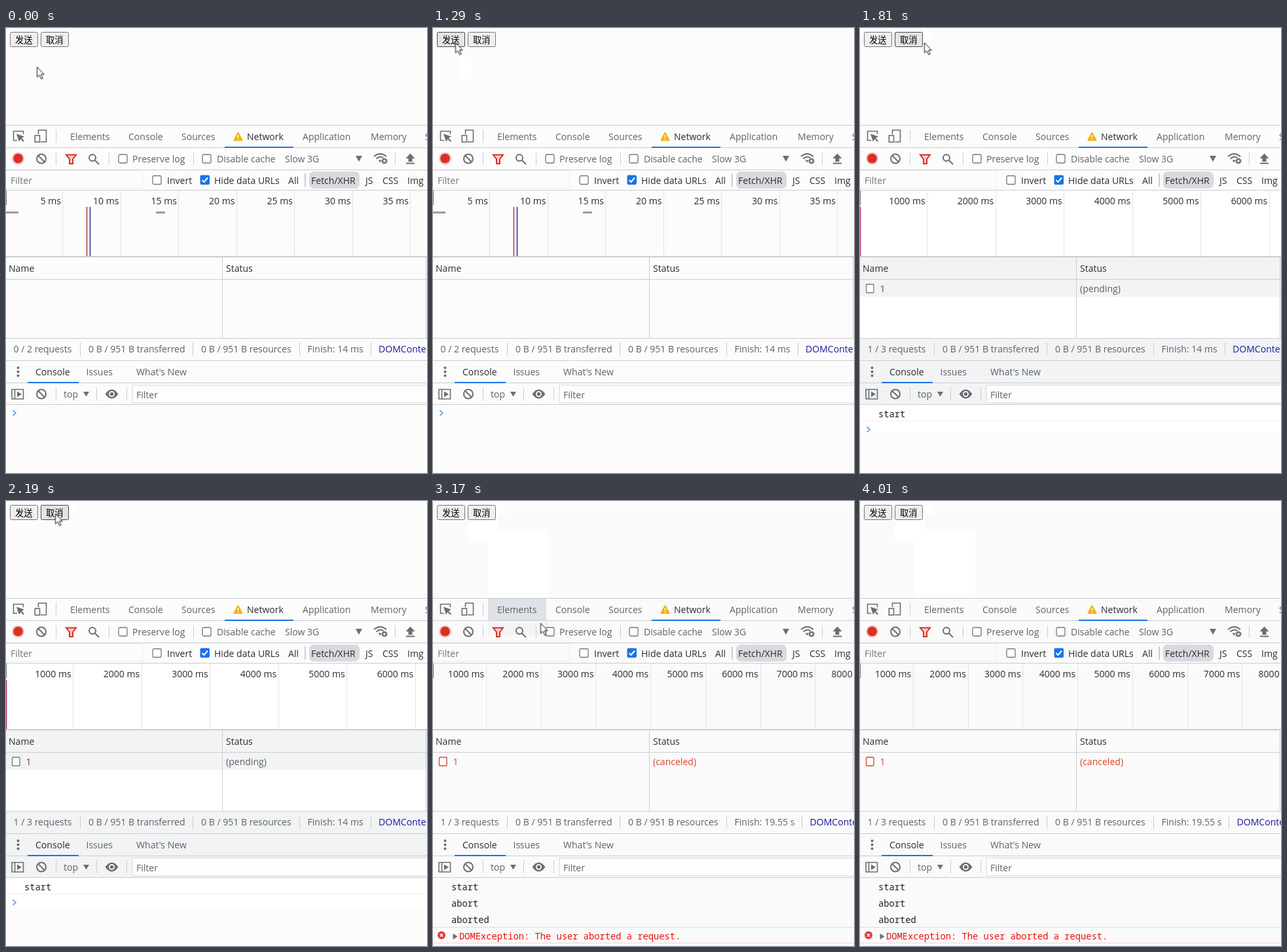
Write an HTML page that moves like this. It is 643x679 px and loops after 4.11 s.

```html
<!DOCTYPE html>
<html lang="zh-CN">
<head>
<meta charset="utf-8">
<title>Abort a request</title>
<style>
html, body { margin: 0; width: 100%; height: 100%; overflow: hidden; background: #fcfcfc; }
svg { display: block; }
text { font: 14.05px "Open Sans", "Noto Sans", sans-serif; fill: #5f6368; white-space: pre; }
.dark text, text.dark { fill: #2b2d30; }
.button text { font: 13.33px "Noto Sans CJK SC", "Noto Sans CJK", sans-serif; fill: #000; }
.mono text { font: 13.75px "Noto Sans Mono", "DejaVu Sans Mono", monospace; fill: #222; }
.link { fill: #1c1c9c; }
text.end { text-anchor: end; }
.rule { stroke: #cbcdd0; fill: none; }
.icon { stroke: #6b6e72; stroke-width: 2; fill: none; }
.solid { fill: #6b6e72; }
.box { fill: #fff; stroke: #75787c; stroke-width: 1.3; }
.button rect { fill: #efefef; stroke: #767676; }
.button .hover { fill: #e4e4e4; stroke: #4a4a4a; }
.red text { fill: #e0432f; }

/* 4110 ms loop; every change is a hard step */
.step, #cursor { animation: 4110ms step-end infinite; }
#idle { animation-name: idle; }
#pending { animation-name: pending; }
#canceled, #dim { animation-name: canceled; }
#sendHover { animation-name: sendHover; }
#cancelHover { animation-name: cancelHover; }
#tabHover { animation-name: tabHover; }
#trailA { animation-name: trailA; }
#trailB { animation-name: trailB; }
#trailC { animation-name: trailC; }
#trailD { animation-name: trailD; }
#cursor { animation-name: move; }
@keyframes idle { 0% { visibility: visible } 37.95%, to { visibility: hidden } }
@keyframes pending { 0%, 63.74%, to { visibility: hidden } 37.95% { visibility: visible } }
@keyframes canceled { 0% { visibility: hidden } 63.74%, to { visibility: visible } }
@keyframes sendHover { 0%, 41.11%, to { visibility: hidden } 25.54% { visibility: visible } }
@keyframes cancelHover { 0%, 73.47%, to { visibility: hidden } 41.11% { visibility: visible } }
@keyframes tabHover { 0%, 81.02%, to { visibility: hidden } 77.12% { visibility: visible } }
@keyframes trailA { 0%, 35.03%, to { visibility: hidden } 22.62% { visibility: visible } }
@keyframes trailB { 0% { visibility: hidden } 44.03%, to { visibility: visible } }
@keyframes trailC { 0% { visibility: hidden } 73.47%, to { visibility: visible } }
@keyframes trailD { 0% { visibility: hidden } 77.12%, to { visibility: visible } }
@keyframes move {
  0% { transform: translate(47.5px, 59.5px) }
  22.62% { transform: translate(43.5px, 45.5px) }
  25.54% { transform: translate(38.5px, 30.5px) }
  28.71% { transform: translate(35.5px, 24.5px) }
  31.38% { transform: translate(34.5px, 22.5px) }
  35.03% { transform: translate(33.5px, 21.5px) }
  41.11% { transform: translate(62.5px, 21.5px) }
  44.03% { transform: translate(98.5px, 22.5px) }
  46.95% { transform: translate(94.5px, 20.5px) }
  49.87% { transform: translate(76.5px, 19.5px) }
  53.28% { transform: translate(75.5px, 19.5px) }
  63.74% { transform: translate(72.5px, 24.5px) }
  73.47% { transform: translate(87.5px, 44.5px) }
  77.12% { transform: translate(164.5px, 186.5px) }
  81.02% { transform: translate(569.5px, 662.5px); visibility: visible }
  83.94%, to { transform: translate(569.5px, 662.5px); visibility: hidden }
}
</style>
</head>
<body>
<svg width="643" height="679" viewBox="0 0 643 679">
<defs>
  <g id="clear" class="icon"><circle r="7"/><path d="M-5-5L5 5"/></g>
  <rect id="check" class="box" width="13" height="13" rx="2"/>
  <path id="prompt" d="M0 0l4.5 4-4.5 4" fill="none" stroke="#6fa3ec" stroke-width="1.7"/>
</defs>
<rect width="643" height="679" fill="#fcfcfc"/>
<rect id="dim" class="step" y="19" width="643" height="660" fill="#fafafa"/>

<!-- lighter patches left by the pointer -->
<g fill="#fff">
  <rect id="trailA" class="step" x="43" y="45" width="16" height="33"/>
  <rect id="trailB" class="step" x="97" y="6" width="13" height="13"/>
  <rect id="trailC" class="step" x="53" y="6" width="46" height="57"/>
  <rect id="trailD" class="step" x="84" y="44" width="92" height="104"/>
</g>

<g class="button">
  <rect x="6.5" y="6.5" width="42" height="22" rx="2"/>
  <rect id="sendHover" class="step hover" x="6.5" y="6.5" width="42" height="22" rx="2"/>
  <text x="14" y="22.5">发送</text>
  <rect x="53.5" y="6.5" width="42" height="22" rx="2"/>
  <rect id="cancelHover" class="step hover" x="53.5" y="6.5" width="42" height="22" rx="2"/>
  <text x="61" y="22.5">取消</text>
</g>

<g id="tabHover" class="step">
  <rect x="84" y="183" width="92" height="22" fill="#f3f4f5"/>
  <rect x="84" y="149" width="89" height="33" fill="#dee1e6"/>
</g>

<!-- main tabs -->
<path class="rule" d="M0 148.5H643M0 182.5H643M0 216.5H643M0 247.5H643M76.5 155V175"/>
<path class="icon" stroke-width="1.6" style="stroke-width:1.6" d="M17 171.5H11.5V157.5H26.5V162"/>
<path class="solid" d="M16 161.5l4 12 2.3-4 4.2 4.3 1.6-1.6-4.2-4.2 4-2.5z"/>
<g class="icon" style="stroke-width:1.6">
  <path d="M49.5 162V155.8H61.5V173.8H53"/><rect x="44.3" y="164" width="7.2" height="10"/>
</g>
<text x="98" y="171">Elements</text>
<text x="187" y="171">Console</text>
<text x="268" y="171">Sources</text>
<path d="M354.5 160l6 11.2h-12z" fill="#f3b20d" stroke="#f3b20d" stroke-width="2" stroke-linejoin="round"/>
<path d="M354.5 163v4.5M354.5 169v1.7" stroke="#fff" stroke-width="1.6"/>
<text x="368" y="171" class="dark">Network</text>
<rect x="334" y="181" width="105" height="2" fill="#1a73e8"/>
<text x="453" y="171">Application</text>
<text x="557" y="171">Memory</text>
<text x="640" y="171">Security</text>

<!-- network toolbar -->
<circle cx="18.5" cy="199" r="9.6" fill="#f4c4c1"/><circle cx="18.5" cy="199" r="7.3" fill="#d93025"/>
<use href="#clear" x="54" y="199.5"/>
<path class="rule" d="M76.5 190V209M157.5 190V209M286.5 190V209M594.5 190V209"/>
<path d="M92 193.5H107L102 200V207H97V200Z" fill="#f6cfcc" stroke="#d93025" stroke-width="2"/>
<path class="icon" d="M135.5 201.5l6.5 6.5"/><circle class="icon" cx="132" cy="198" r="5"/>
<use href="#check" x="172" y="193"/>
<text x="193" y="205">Preserve log</text>
<use href="#check" x="300" y="193"/>
<text x="322" y="205">Disable cache</text>
<text x="426" y="205">Slow 3G</text>
<path class="solid" d="M534 195h10l-5 9z"/>
<path class="icon" d="M562 196q9.500-8 19 0M565.500 199.500q6-5 11 -1.500"/>
<path class="solid" d="M568.500 201.500h5l-2 4z"/>
<circle class="icon" cx="578" cy="203" r="2.800"/>
<circle class="icon" cx="578" cy="203" r="4" style="stroke-width:1.500;stroke-dasharray:1.600 1.540"/>
<path class="solid" d="M617.500 191.500l7 7.500h-4v5h-6v-5h-4zM611 205.500h13v2h-13z"/>

<!-- filter row -->
<path d="M0 217.500H208.500V244.500H0" fill="none" stroke="#ececec"/>
<text x="7" y="238" style="fill:#757575">Filter</text>
<use href="#check" x="224" y="225.500"/>
<rect x="296.500" y="224.500" width="14.500" height="14.500" rx="2" fill="#1a73e8"/>
<path d="M299.500 232l3 3 5.500-6.500" fill="none" stroke="#fff" stroke-width="2"/>
<path class="rule" stroke-width="2" d="M457 222V242"/>
<rect x="463" y="219" width="77" height="26" rx="7" fill="#d8dae0"/>
<g class="dark">
  <text x="246" y="238">Invert</text>
  <text x="318" y="238">Hide data URLs</text>
  <text x="431" y="238">All</text>
  <text x="466" y="238">Fetch/XHR</text>
  <text x="549" y="238">JS</text>
  <text x="575" y="238">CSS</text>
  <text x="613" y="238">Img</text>
</g>

<!-- phase backgrounds and contents -->
<g id="idle" class="step">
  <g class="ticks" data-first="86.5" data-gap="88.500" data-unit="5" data-pad="2.500"></g>
  <path d="M0 281.500H19M229 281.500H243" stroke="#9b9b9b" stroke-width="3"/>
  <path d="M123.500 273V348" stroke="#a3202a" stroke-width="1.300"/>
  <path d="M128.500 273V348" stroke="#2a2aa8" stroke-width="1.500"/>
  <text x="11.500" y="495">0 / 2 requests</text>
  <text x="460.500" y="495">Finish: 14 ms</text>
  <text x="569" y="495" class="link">DOMContentLoaded: 7 ms</text>
  <path class="rule" d="M557.500 480V500"/>
  <use href="#prompt" x="10.500" y="583.500"/>
</g>

<g id="pending" class="step">
  <rect y="248" width="643" height="370" fill="#fff"/>
  <path d="M0 349H643V383H0zM0 384H643V410H0zM0 474H643V574H0z" fill="#f1f3f4"/>
  <g class="ticks" data-first="102.500" data-gap="104.500" data-unit="1000" data-pad="2.800"></g>
  <path d="M.5 273V348" stroke="#b02a62" stroke-width="1.500"/>
  <rect class="box" x="9.500" y="391" width="11.500" height="13" rx="1"/>
  <text x="30.500" y="403" style="fill:#8c3317">1</text>
  <text x="336" y="403">(pending)</text>
  <text x="11.500" y="495">1 / 3 requests</text>
  <text x="460.500" y="495">Finish: 14 ms</text>
  <text x="569" y="495" class="link">DOMContentLoaded: 7 ms</text>
  <path class="rule" d="M557.500 480V500"/>
  <g class="mono"><text x="28" y="594">start</text></g>
  <path d="M0 599.500H643" stroke="#f0f0f0"/>
  <use href="#prompt" x="10.500" y="608.500"/>
</g>

<g id="canceled" class="step">
  <g class="ticks" data-first="81.500" data-gap="83.700" data-unit="1000" data-pad="3.300"></g>
  <rect class="box" x="9.500" y="391" width="11.500" height="13" rx="1" style="stroke:#e0432f"/>
  <g class="red"><text x="30.500" y="403">1</text><text x="336" y="403">(canceled)</text></g>
  <text x="11.500" y="495">1 / 3 requests</text>
  <text x="460.500" y="495">Finish: 19.55 s</text>
  <text x="575.500" y="495" class="link">DOMContentLoaded: 7 ms</text>
  <path class="rule" d="M563.500 480V500"/>
  <path d="M0 650.500H643M0 674.500H643" stroke="#fbd3d3"/>
  <circle cx="13" cy="662.500" r="6" fill="#e0393c"/>
  <path d="M10.700 660.200l4.600 4.600m0-4.600l-4.600 4.600" stroke="#fff" stroke-width="1.500"/>
  <path class="solid" d="M30.500 660l7 4.500-7 4.500z"/>
  <g class="mono">
    <text x="28" y="594">start</text>
    <text x="28" y="619">abort</text>
    <text x="28" y="644">aborted</text>
    <text x="40" y="669" style="fill:#e8100c">DOMException: The user aborted a request.</text>
  </g>
</g>

<!-- request table -->
<path d="M.5 248V270" stroke="#777"/>
<path class="rule" stroke-width="2" d="M0 349H643"/>
<path class="rule" d="M0 383.500H643M0 473.500H643M330.500 350V473M641.500 350V473"/>
<g class="dark"><text x="4" y="372">Name</text><text x="336" y="372">Status</text></g>
<text x="126" y="495">0 B / 951 B transferred</text>
<text x="298" y="495">0 B / 951 B resources</text>
<path class="rule" d="M113.500 480V500M285.500 480V500M448.500 480V500"/>

<!-- drawer -->
<path class="rule" d="M0 507.500H643M0 541.500H643M0 574.500H643M76.500 548V568M138.500 548V568M184.500 548V568"/>
<g class="solid"><circle cx="18.500" cy="518.500" r="2"/><circle cx="18.500" cy="524.500" r="2"/><circle cx="18.500" cy="530.500" r="2"/></g>
<text x="45" y="530" class="dark">Console</text>
<rect x="33" y="540" width="78" height="2" fill="#1a73e8"/>
<text x="122.500" y="530">Issues</text>
<text x="199" y="530">What's New</text>
<path class="icon" style="stroke-width:1.600" d="M9 551.500H26.500V566H9zM13.500 551.500V566"/>
<path class="solid" d="M17 554.500l7 4.300-7 4.300z"/>
<use href="#clear" x="54" y="558.500"/>
<text x="88" y="564">top</text>
<path class="solid" d="M118 555h9l-4.500 7.500z"/>
<path class="solid" d="M151.500 558.500q10-14 20 0-10 14-20 0z"/>
<circle cx="161.500" cy="558.500" r="3.600" fill="#6b6e72" stroke="#fff" stroke-width="1.700"/>
<rect x="193" y="545" width="460" height="27" fill="#fdfdfd" stroke="#e3e4e6" stroke-width="1.500"/>
<text x="199" y="565">Filter</text>

<path id="cursor" d="M0 0V15.500L3.500 12.300 6.200 18.300 8.700 17.200 6 11.300H10.800Z" fill="#fff" stroke="#111"/>
</svg>
<script>
const make = (parent, tag, attrs) => {
  const node = document.createElementNS("http://www.w3.org/2000/svg", tag);
  for (const key in attrs) node.setAttribute(key, attrs[key]);
  return parent.appendChild(node);
};
// Timeline grid: evenly spaced lines, each with a label ending just before it.
for (const group of document.querySelectorAll(".ticks")) {
  const [first, gap, unit, pad] = ["first", "gap", "unit", "pad"].map(k => +group.dataset[k]);
  for (let i = 0; first + gap * i < 700; i++) {
    const x = first + gap * i;
    make(group, "path", { d: `M${Math.floor(x) + .5} 248V348`, stroke: "#e2e3e5" });
    make(group, "text", { x: x - pad, y: 269, class: "end dark" }).textContent = `${unit * (i + 1)} ms`;
  }
}
</script>
</body>
</html>
```
